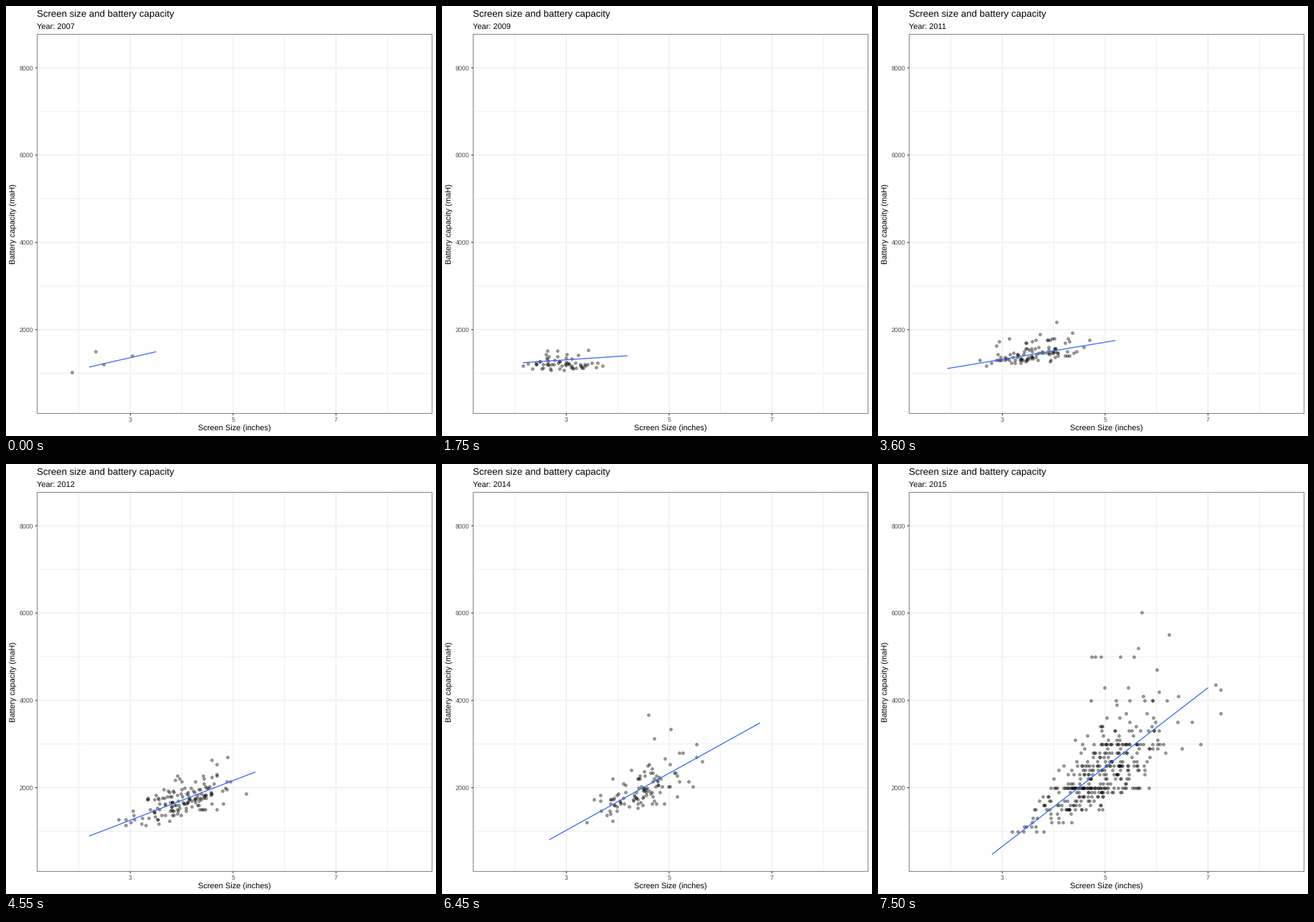
Animation of 600x600 px, one loop 8000 ms. Source, as a matplotlib script:

```python
import matplotlib.pyplot as plt
import numpy as np
from matplotlib.animation import FuncAnimation
from matplotlib.patches import Rectangle

SIZE, STEP_MS, LOOP_MS = 600, 50, 8000
FIRST_MOVE, MOVE_PERIOD = 500, 950
FIRST_YEAR = 2007
PX = 0.72  # points per pixel at 100 dpi
LEFT, TOP, RIGHT, BOTTOM = 43.5, 39.5, 594.5, 568.5
BLUE, INK, GRID, TICK = "#3366FF", "#333333", "#EBEBEB", "#4D4D4D"

rng = np.random.default_rng(7)


def sx(inches):
    return 173.4 + (inches - 3) * 71.77


def sy(capacity):
    return 451.6 - (capacity - 2000) * 0.0609


def to_px(data):
    inches, capacity = np.transpose(data)
    return np.column_stack([sx(inches), sy(capacity)])


# Trend line per year: screen sizes and capacities at both ends.
TRENDS = [
    ((2.2, 3.5), (1143, 1493)),
    ((2.0, 3.8), (1202, 1366)),
    ((2.2, 4.3), (1255, 1412)),
    ((2.2, 5.0), (1186, 1530)),
    ((1.8, 5.3), (1071, 1862)),
    ((2.4, 5.5), (800, 2608)),
    ((2.8, 6.3), (964, 3036)),
    ((2.6, 7.0), (726, 3708)),
    ((2.8, 7.0), (471, 4289)),
]
LINES = [to_px(np.transpose(trend)).T for trend in TRENDS]

# Phones per year after the first: count, mean size, size spread,
# capacity spread relative to the trend.
CLOUDS = [
    (62, 2.82, 0.42, 0.15),
    (85, 3.00, 0.45, 0.14),
    (100, 3.23, 0.60, 0.11),
    (145, 3.75, 0.60, 0.10),
    (165, 4.13, 0.58, 0.18),
    (106, 4.56, 0.50, 0.18),
    (170, 4.58, 0.65, 0.18),
    (365, 4.92, 0.58, 0.18),
]
FIRST_PHONES = [(1.87, 1030), (2.32, 1500), (2.48, 1200), (3.03, 1400)]
GIANTS = [(5.71, 6020), (4.74, 5000), (4.81, 5000), (4.92, 5000), (5.29, 5000),
          (5.56, 5000), (7.15, 4360), (7.25, 4250), (7.25, 3700), (6.42, 4100),
          (6.69, 3500), (6.85, 3000)]


def cloud(trend, n, mean, size_sd, spread):
    """Jittered scatter around a trend, crowded on round capacities."""
    sizes, caps = trend
    size = np.clip(rng.normal(mean, size_sd, n), *sizes)
    skewed = rng.gamma(4, 0.5, n) - 2  # zero mean, unit deviation, long upper tail
    capacity = np.polyval(np.polyfit(sizes, caps, 1), size) * (1 + spread * skewed)
    grain = rng.choice([100, 500, 1000], n, p=[0.72, 0.14, 0.14])
    capacity = np.where(capacity < 1500, 100, grain) * np.round(
        capacity / np.where(capacity < 1500, 100, grain))
    return to_px(np.column_stack([size + rng.uniform(-0.4, 0.4, n),
                                  np.maximum(capacity, 1000)]))


states = [to_px(FIRST_PHONES)]
states += [cloud(trend, *spec) for trend, spec in zip(TRENDS[1:], CLOUDS)]
states[-1] = np.vstack([states[-1], to_px(GIANTS)])


def pair(start, end):
    """Random partners; points left over take no part in the move."""
    n = min(len(start), len(end))
    return rng.permutation(start)[:n], rng.permutation(end)[:n]


moves = [pair(a, b) for a, b in zip(states, states[1:])]

plt.rcParams.update({"font.family": "Liberation Sans", "text.hinting": "none",
                     "path.snap": False})
fig = plt.figure(figsize=(6, 6), dpi=100, facecolor="white")
ax = fig.add_axes([0, 0, 1, 1])
ax.set_xlim(0, SIZE)
ax.set_ylim(SIZE, 0)
ax.axis("off")


def rule(xs, ys, color, width, z=1):
    return ax.plot(xs, ys, color=color, lw=width * PX, zorder=z,
                   solid_capstyle="butt")[0]


def label(x, y, text, size, color="black", ha="left", angle=0):
    return ax.text(x, y, text, fontsize=size * PX, color=color, ha=ha,
                   va="baseline", rotation=angle, rotation_mode="anchor")


for inches in range(2, 9):
    major = inches in (3, 5, 7)
    x = sx(inches)
    rule([x, x], [TOP, BOTTOM], GRID, 1.07 if major else 0.8)
    if major:
        rule([x, x], [BOTTOM, BOTTOM + 2.75], INK, 1.07)
        label(x, 580.2, str(inches), 8.8, TICK, "center")
for capacity in range(1000, 9000, 1000):
    major = capacity % 2000 == 0
    y = sy(capacity)
    rule([LEFT, RIGHT], [y, y], GRID, 1.07 if major else 0.8)
    if major:
        rule([LEFT - 2.75, LEFT], [y, y], INK, 1.07)
        label(38.2, y + 3.3, str(capacity), 8.8, TICK, "right")

ax.add_patch(Rectangle((LEFT, TOP), RIGHT - LEFT, BOTTOM - TOP, fill=False,
                       ec=INK, lw=0.6 * PX, zorder=5))
label(43, 15.4, "Screen size and battery capacity", 13.2)
subtitle = label(43, 32.2, "", 11)
label(318.8, 593.2, "Screen Size (inches)", 11, ha="center")
label(13.6, 304, "Battery capacity (maH)", 11, ha="center", angle=90)

dots = ax.scatter([], [], s=(3.9 * PX) ** 2, facecolors=(0, 0, 0, 0.4),
                  edgecolors=(0, 0, 0, 0.4), linewidths=0.71 * PX, zorder=3)
fit = rule([], [], BLUE, 1.25, 4)


def progress(ms):
    """Index of the current move and how much of it is done."""
    k = (ms - FIRST_MOVE) // MOVE_PERIOD
    if k < 0:
        return 0, 0.0
    steps = 8 if k == len(moves) - 1 else 9
    done = (ms - FIRST_MOVE - k * MOVE_PERIOD) // STEP_MS + 1
    return k, min(done / steps, 1.0)


def update(i):
    k, t = progress(i * STEP_MS)
    if t in (0.0, 1.0):
        points = states[k + int(t)]
    else:
        a, b = moves[k]
        points = a + (b - a) * t
    dots.set_offsets(points)
    fit.set_data(*(LINES[k] + (LINES[k + 1] - LINES[k]) * t))
    subtitle.set_text(f"Year: {FIRST_YEAR + k + (t >= 0.5)}")
    return dots, fit, subtitle


anim = FuncAnimation(fig, update, frames=LOOP_MS // STEP_MS, interval=STEP_MS,
                     repeat=True, repeat_delay=0, blit=False)
plt.show()
```
